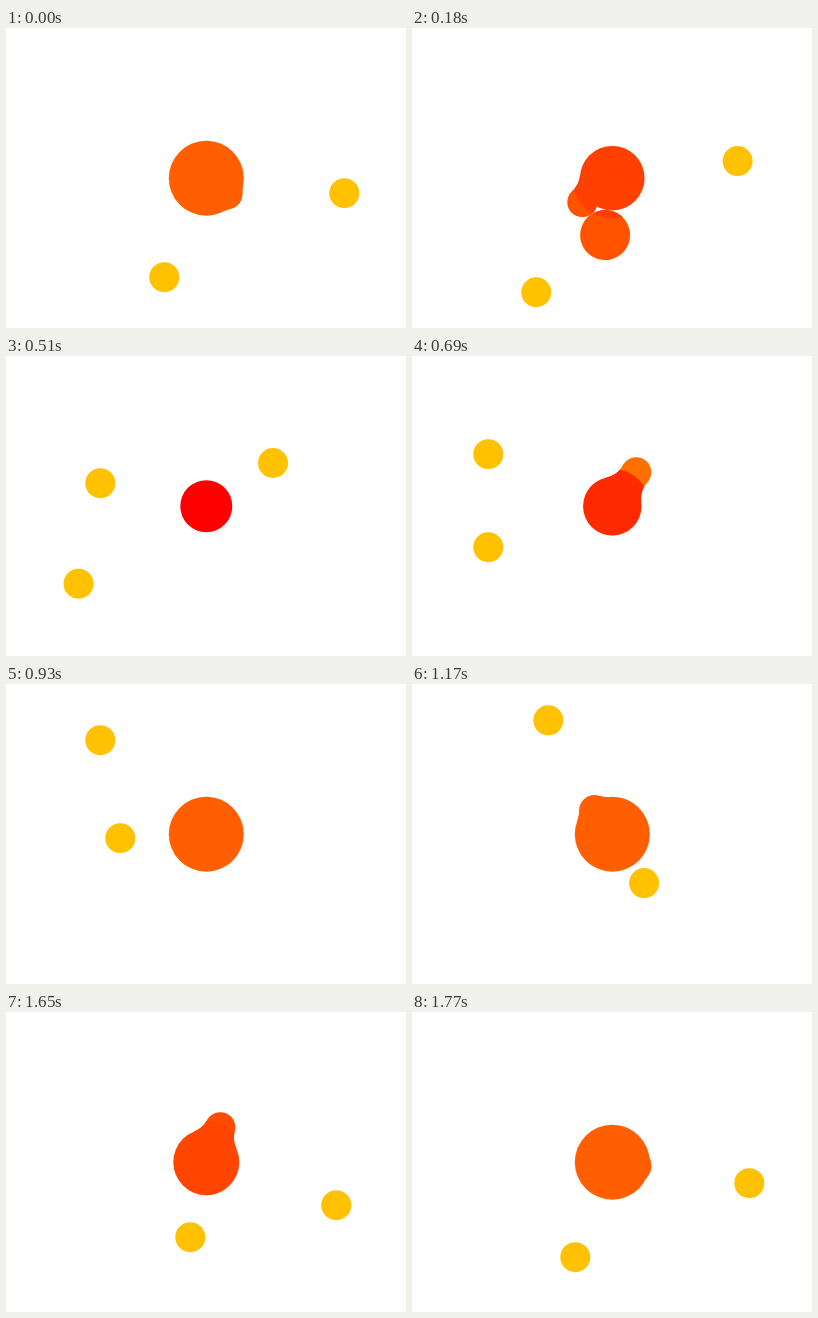
These frames come from a looping animation (400 by 300 pixels, 1.8 s). An HTML page with a canvas:

```html
<!DOCTYPE html>
<html lang="en">
<head>
<meta charset="utf-8">
<title>Orbiting drops</title>
<style>
  html, body { margin: 0; width: 100%; height: 100%; overflow: hidden; background: #fff; }
  canvas { display: block; }
</style>
</head>
<body>
<canvas id="stage" width="400" height="300"></canvas>
<script>
const ctx = document.getElementById('stage').getContext('2d');
const LOOP = 1800, STEP = 30;
const CORE_MIN = 26, CORE_MAX = 37.5, DROP = 15;

// Closed orbits around the core: [time, x, y]
const orbits = [
  [[0, 138, 15], [165, 127, -15], [330, 103, -34], [540, 60, -43], [690, 24, -34],
   [800, -2, -24], [930, -16, 6], [1040, 0, 32], [1150, 27, 47], [1260, 53, 54],
   [1380, 79, 55], [1500, 105, 55], [1650, 130, 43], [1770, 137, 21]],
  [[0, -42, 99], [195, -79, 114], [330, -106, 104], [540, -129, 72], [690, -124, 41],
   [930, -86, 4], [1090, -45, -19], [1230, 0, -22], [1380, 21, 12], [1500, 11, 45],
   [1650, -16, 75], [1770, -37, 95]],
  [[0, 21, 16], [60, 5, 26], [180, -30, 24], [330, -73, 3], [510, -106, -23],
   [690, -124, -52], [810, -122, -75], [930, -106, -94], [1080, -83, -111],
   [1150, -68, -114], [1270, -45, -107], [1380, -24, -90], [1650, 14, -35], [1770, 24, 4]]
];

const clamp = (v, lo, hi) => Math.min(hi, Math.max(lo, v));
const rgb = g => `rgb(255,${Math.round(g)},0)`;

// Smooth periodic curve through the orbit points
function locate(orbit, t) {
  const n = orbit.length;
  const at = i => {
    const [time, x, y] = orbit[(i + n) % n];
    return [time + Math.floor(i / n) * LOOP, x, y];
  };
  let i = n - 1;
  while (orbit[i][0] > t) i--;
  const [before, a, b, after] = [at(i - 1), at(i), at(i + 1), at(i + 2)];
  const span = b[0] - a[0], s = (t - a[0]) / span;
  const slope = (p, q, r, k) => {
    const h1 = q[0] - p[0], h2 = r[0] - q[0];
    return ((q[k] - p[k]) / h1 * h2 + (r[k] - q[k]) / h2 * h1) / (h1 + h2);
  };
  const [x, y] = [1, 2].map(k => {
    const m0 = slope(before, a, b, k) * span, m1 = slope(a, b, after, k) * span;
    return a[k] + s * (m0 + s * (3 * (b[k] - a[k]) - 2 * m0 - m1
      + s * (2 * (a[k] - b[k]) + m0 + m1)));
  });
  return { x, y, d: Math.hypot(x, y) };
}

function disc(x, y, r) {
  ctx.beginPath();
  ctx.arc(x, y, r, 0, 2 * Math.PI);
}

function fillDisc(x, y, r) {
  disc(x, y, r);
  ctx.fill();
}

// Liquid bridge between core and drop, edged by two tangent fillets
function bridge({ x, y, d }, core) {
  const fillet = 25 * clamp((50 - d) / 6, 0, 1);
  const p = core + fillet, q = DROP + fillet;
  if (!fillet || d >= p + q || d <= core - DROP) return null;
  const dir = Math.atan2(y, x);
  const spread = Math.acos(clamp((p * p + d * d - q * q) / (2 * p * d), -1, 1));
  const path = new Path2D();
  for (const side of [-1, 1]) {
    const angle = dir + side * spread;
    const fx = p * Math.cos(angle), fy = p * Math.sin(angle);
    const toCore = angle + Math.PI, toDrop = Math.atan2(y - fy, x - fx);
    const [from, to] = side < 0 ? [toCore, toDrop] : [toDrop, toCore];
    path.arc(fx, fy, fillet, from, to, true);
  }
  path.closePath();
  return path;
}

function draw(t) {
  const drops = orbits.map(orbit => locate(orbit, t));
  const nearest = Math.min(...drops.map(drop => drop.d));
  const swell = clamp((45 - nearest) / 12, 0, 1);
  const core = CORE_MIN + (CORE_MAX - CORE_MIN) * swell;
  const coreGreen = 95 * Math.pow(swell, 0.65);

  ctx.setTransform(1, 0, 0, 1, 0, 0);
  ctx.fillStyle = '#fff';
  ctx.fillRect(0, 0, 400, 300);
  ctx.translate(200.3, 150.2);

  for (const drop of drops) {
    const neck = bridge(drop, core);
    const paint = green => {
      ctx.fillStyle = rgb(green);
      fillDisc(drop.x, drop.y, DROP);
      if (neck) ctx.fill(neck);
    };
    paint(clamp(115 + (drop.d - 42) * 9, coreGreen, 193));
    if (neck) {
      ctx.save();
      disc(0, 0, core + 8);
      ctx.clip();
      paint(coreGreen);
      ctx.restore();
    }
  }
  ctx.fillStyle = rgb(coreGreen);
  fillDisc(0, 0, core);
}

const start = performance.now();
function tick() {
  const t = (performance.now() - start) % LOOP;
  draw(Math.floor(t / STEP) * STEP);
  requestAnimationFrame(tick);
}
tick();
</script>
</body>
</html>
```
